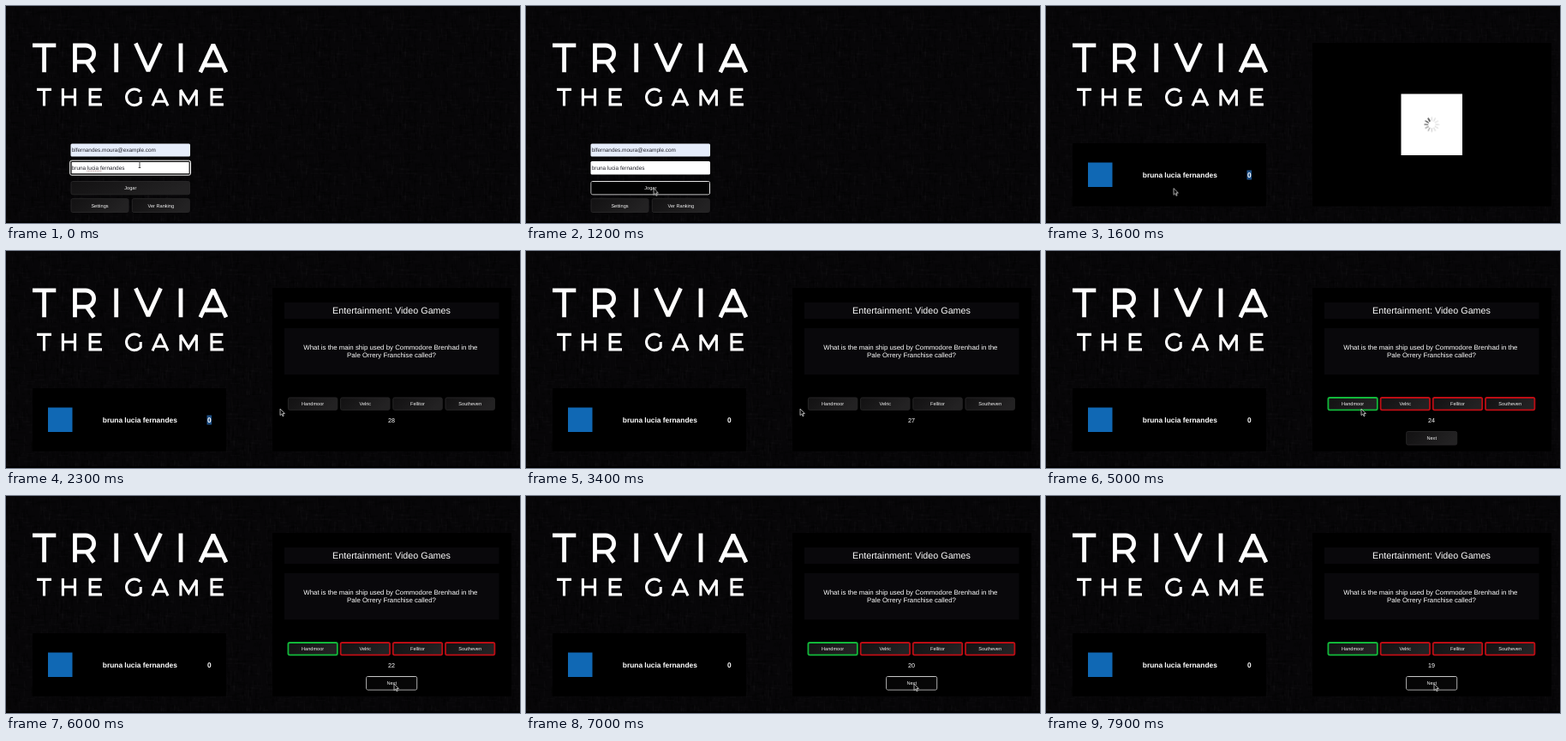
Recreate the animation shown at these times as an HTML page with a canvas. Size 600 px wide and 253 px high, loop 8000 ms.

```html
<!DOCTYPE html>
<html lang="pt">
<head>
<meta charset="utf-8">
<title>Trivia</title>
<style>
  html, body { margin: 0; width: 100%; height: 100%; overflow: hidden; background: #060507; }
  canvas, svg { position: absolute; left: 0; top: 0; width: 600px; height: 253px; }
  text { font-family: "Liberation Sans", Arial, sans-serif; fill: #fff; text-anchor: middle;
    text-rendering: geometricPrecision; }
  .field { font-size: 6.43px; fill: #23232b; text-anchor: start; }
  .btn rect { fill: url(#shade); stroke: #262526; }
  .btn text { font-size: 5.6px; fill: #f2f2f2; }
  .bold { font-size: 8.4px; font-weight: bold; }
  .lettering { fill: none; stroke: #fff; stroke-miterlimit: 2; }

  /* One loop is 8 s, so 1% is 80 ms. */
  .step { animation: 8s step-end infinite; }
  .login { animation-name: login; }
  .game { animation-name: game; }
  .load { animation-name: load; }
  .quiz { animation-name: quiz; }
  .focus { animation-name: focus; }
  .mark { animation-name: mark; }
  .ibeam { animation-name: ibeam; }
  .arrow { animation-name: arrow; }
  .next { animation-name: next; }
  @keyframes login { 0% { opacity: 1 } 16.25%, 100% { opacity: 0 } }
  @keyframes game { 0% { opacity: 0 } 16.25%, 100% { opacity: 1 } }
  @keyframes load { 0% { opacity: 1 } 23.75%, 100% { opacity: 0 } }
  @keyframes quiz { 0% { opacity: 0 } 23.75%, 100% { opacity: 1 } }
  @keyframes focus { 0% { opacity: 1 } 10.5%, 100% { opacity: 0 } }
  @keyframes mark { 0% { opacity: 1 } 38.6%, 100% { opacity: 0 } }
  @keyframes ibeam { 0% { opacity: 1 } 3.8%, 100% { opacity: 0 } }
  @keyframes arrow { 0% { opacity: 0 } 3.8%, 100% { opacity: 1 } }
  @keyframes next { 0% { opacity: 0 } 59%, 100% { opacity: 1 } }

  .play rect { animation: play 8s linear infinite; }
  .right rect { animation: right 8s linear infinite; }
  .wrong rect { animation: wrong 8s linear infinite; }
  .next rect { animation: hover 8s linear infinite; }
  .dim { animation: 8s linear infinite; }
  @keyframes play { 0%, 10% { stroke: #262526 } 12.2%, 100% { stroke: #e4e4e4 } }
  @keyframes right {
    0%, 58.6% { stroke: #262526; stroke-width: 1 }
    61%, 100% { stroke: #12b83a; stroke-width: 1.8 }
  }
  @keyframes wrong {
    0%, 58.6% { stroke: #262526; stroke-width: 1 }
    61%, 100% { stroke: #bd0d14; stroke-width: 1.8 }
  }
  @keyframes hover { 0%, 71.5% { stroke: #262526 } 74%, 100% { stroke: #c6c6c6 } }
  .play .dim { animation-name: dimPlay; }
  .right .dim { animation-name: dimRight; }
  .next .dim { animation-name: dimNext; }
  @keyframes dimPlay { 0%, 4.5% { opacity: 0 } 6%, 100% { opacity: 1 } }
  @keyframes dimRight { 0%, 53% { opacity: 0 } 55%, 58.6% { opacity: 1 } 61%, 100% { opacity: 0 } }
  @keyframes dimNext { 0%, 71.5% { opacity: 0 } 74%, 100% { opacity: .8 } }

  .timer { position: absolute; left: 430px; top: 194px; width: 40px; text-align: center;
    font: 7.2px/8px "Liberation Sans", Arial, sans-serif; color: #fff; animation-name: quiz; }
  .timer::after { content: "29"; animation: count 8s step-end infinite; }
  @keyframes count {
    0% { content: "29" } 28% { content: "28" } 36% { content: "27" } 43.5% { content: "26" }
    51% { content: "25" } 58.5% { content: "24" } 66% { content: "23" } 73% { content: "22" }
    79.75% { content: "21" } 87% { content: "20" } 94.5%, 100% { content: "19" }
  }

  .spin { animation: spin 1s steps(12) infinite; }
  @keyframes spin { from { transform: rotate(120deg) } to { transform: rotate(480deg) } }

  .cursor { animation: move 8s ease-in-out infinite; }
  @keyframes move {
    0%, 1% { transform: translate(156px, 185px) }
    6.2%, 25.5% { transform: translate(149px, 212.5px) }
    28.6%, 42.5% { transform: translate(320px, 184px) }
    51%, 66% { transform: translate(368px, 184px) }
    74.5%, 100% { transform: translate(453px, 219px) }
  }
</style>
</head>
<body>
<canvas id="wall" width="600" height="253"></canvas>
<svg viewBox="0 0 600 253">
  <defs>
    <linearGradient id="shade" x2="1" y2=".25">
      <stop stop-color="#121112"/><stop offset="1" stop-color="#232223"/>
    </linearGradient>
  </defs>

  <g class="lettering" role="img" aria-label="Trivia the game">
    <path stroke-width="4.8" d="M31 45.9H58.3M44.6 43.6V77.3 M80.5 77.3V46H93a9.6 9.6 0 0 1 0 19.2H80.5M94 64.8L102.6 77.3
      M128.7 43.6V77.3 M151.4 43.6L166 75.8L180.6 43.6 M204 43.6V77.3 M226.8 77.3L241.9 45.1L257 77.3M232.5 69H251.3"/>
    <path stroke-width="3.1" d="M36 97.4H53M44.5 95.9V116.4 M66.4 95.9V116.4M80.5 95.9V116.4M66.4 106H80.5
      M111.6 97.4H98.1V114.9H112M98.1 106H110 M156.5 99.8A9.3 9.3 0 1 0 157.2 112V106
      M171 116.4L180 96.9L189 116.4M174.4 111.2H185.6 M203.9 116.4V97.9L213.2 113L222.4 97.9V116.4
      M253.4 97.4H240V114.9H253.9M240 106H251.8"/>
  </g>

  <g class="step login">
    <rect x="75.5" y="160.5" width="139.5" height="15" rx="1.5" fill="#e6edfb"/>
    <text class="field" x="76.7" y="170.3">blfernandes.moura@example.com</text>
    <rect x="75.5" y="181" width="139.5" height="15.5" rx="1.5" fill="#fff"/>
    <g class="step focus" fill="none">
      <rect x="74.7" y="180.2" width="140.8" height="17" rx="2" stroke="#fff"/>
      <rect x="76" y="181.5" width="138.2" height="14.4" rx="1" stroke="#0b0b0b" stroke-width="1.2"/>
      <path d="M94.3 192.3H112" stroke="#8d5a5a" stroke-width=".7" stroke-dasharray="1 .6"/>
    </g>
    <text class="field" x="76.7" y="191.1">bruna lucia fernandes</text>
    <g id="menu"></g>
  </g>

  <g class="step game">
    <rect x="31" y="160" width="226" height="73.5"/>
    <rect x="49" y="182.5" width="28.5" height="28.5" fill="#1068b4"/>
    <text class="bold" x="156.3" y="199.5">bruna lucia fernandes</text>
    <rect class="step mark" x="234.5" y="191.5" width="5.6" height="11" fill="#1d4f86"/>
    <text class="bold" x="237.3" y="199.5">0</text>

    <rect x="311" y="43" width="279" height="190.5"/>
    <g class="step load">
      <rect x="414.5" y="102.5" width="71.5" height="71.5" fill="#fff"/>
      <g transform="translate(450.3 138.2)"><g class="spin" id="spokes"></g></g>
    </g>
    <g class="step quiz">
      <path d="M325 60h250.5v19H325zM325 90h250.5v54H325z" fill="#09080b"/>
      <text x="450" y="73.3" font-size="10.75">Entertainment: Video Games</text>
      <text font-size="7.85">
        <tspan x="450" y="114.8">What is the main ship used by Commodore Brenhad in the</tspan>
        <tspan x="450" y="124.2">Pale Orrery Franchise called?</tspan>
      </text>
      <g id="answers"></g>
    </g>
  </g>
  <rect y="251.3" width="600" height="1.7"/>
</svg>
<div class="timer step"></div>
<svg viewBox="0 0 600 253">
  <g class="cursor">
    <path class="step ibeam" d="M-1.3 -3.5H1.3M0 -3.5V3.5M-1.3 3.5H1.3" fill="none" stroke="#222" stroke-width=".8"/>
    <path class="step arrow" d="M0 0V7.6L1.8 6L3 8.7L4.2 8.2L3 5.5H5.4Z" fill="#0a0a0a" stroke="#e8e8e8" stroke-width=".7"/>
  </g>
</svg>
<script>
  const $ = id => document.getElementById(id);

  function button(x, y, w, h, label, cls = '') {
    const box = `x="${x}" y="${y}" width="${w}" height="${h}" rx="1.8"`;
    const dim = cls && cls !== 'wrong'
      ? `<path class="dim" d="M${x + .5} ${y + .5}h${w - 1}v${h - 1}h${1 - w}z" fill="#020202"/>` : '';
    return `<g class="btn ${cls}"><rect ${box}/>${dim}
      <text x="${x + w / 2}" y="${y + h / 2 + 2}">${label}</text></g>`;
  }

  $('menu').innerHTML =
    button(76, 204.5, 138.5, 15.3, 'Jogar', 'play') +
    button(76, 224.7, 67, 15.8, 'Settings') +
    button(147.3, 224.7, 67, 15.8, 'Ver Ranking');

  $('answers').innerHTML = ['Handmoor', 'Velric', 'Fellitor', 'Southeven']
    .map((name, i) => button(329.4 + i * 61.2, 171, 57.4, 14.3, name, i ? 'wrong' : 'right'))
    .join('') + button(420.7, 210.5, 59, 15.5, 'Next', 'step next');

  for (let i = 0; i < 12; i++) {
    const fade = Math.max(.15, 1 - i * .16);
    $('spokes').innerHTML += `<path d="M0 -4.6V-8.3" stroke="#000" stroke-width="1.2"
      stroke-linecap="round" opacity="${fade}" transform="rotate(${-i * 30})"/>`;
  }

  // Faint worn wallpaper, tiled.
  let seed = 7;
  const rand = () => (seed = seed * 16807 % 2147483647) / 2147483647;
  const tile = document.createElement('canvas');
  tile.width = 100;
  tile.height = 84;
  const pen = tile.getContext('2d');
  pen.fillStyle = '#070608';
  pen.fillRect(0, 0, 100, 84);
  for (let i = 0; i < 420; i++) {
    const long = 3 + rand() * 10, thin = 1 + rand() * 1.5, tall = rand() < .6;
    pen.fillStyle = rand() < .5 ? 'rgba(255,245,255,.012)' : 'rgba(0,0,0,.22)';
    pen.fillRect(rand() * 100, rand() * 84, tall ? thin : long, tall ? long : thin);
  }
  const wall = $('wall').getContext('2d');
  wall.fillStyle = wall.createPattern(tile, 'repeat');
  wall.fillRect(0, 0, 600, 253);
</script>
</body>
</html>
```
